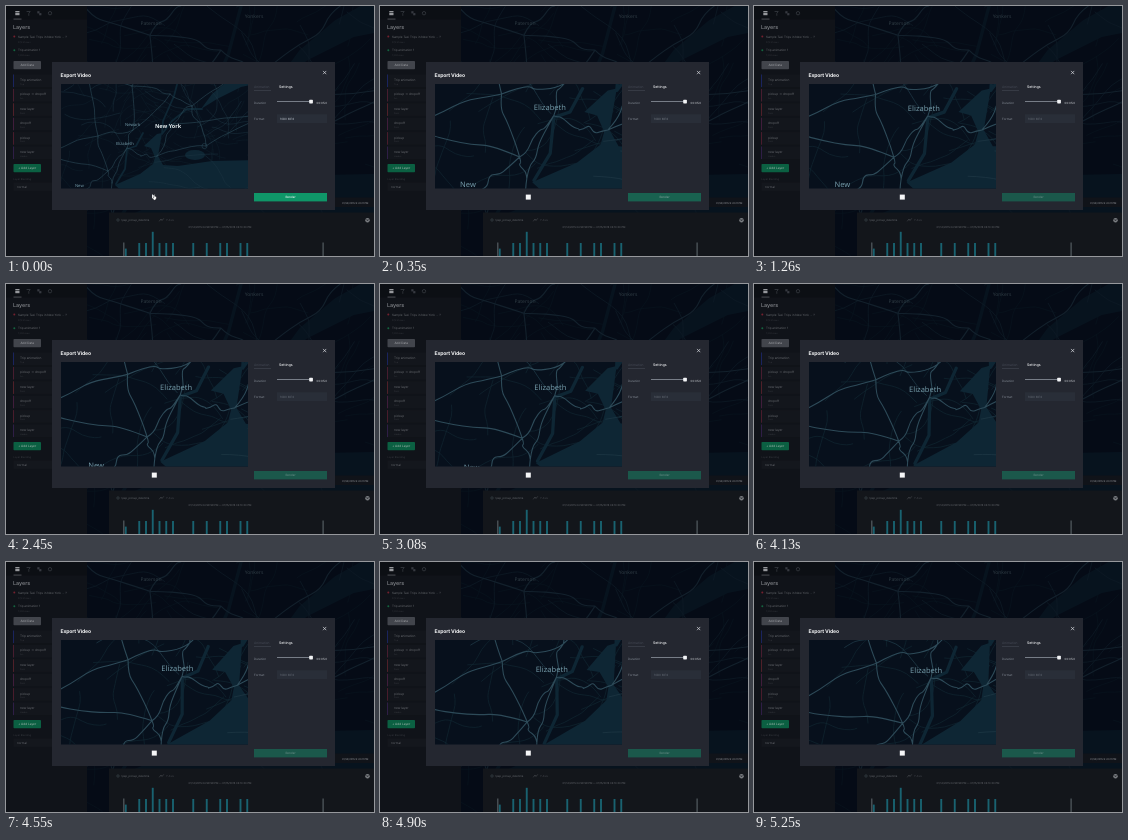
Animation of 368 by 250 pixels, one loop 5.32 s. Source, as an HTML page:

```html
<!DOCTYPE html>
<html lang="en">
<head>
<meta charset="utf-8">
<title>Export Video</title>
<style>
html, body { margin: 0; width: 100%; height: 100%; overflow: hidden; background: #040913; }
svg { display: block; width: 100%; height: 100%; font-family: Inter, "Liberation Sans", sans-serif; text-rendering: geometricPrecision; }
.place { font-family: "Noto Sans", Roboto, sans-serif; text-anchor: middle; }
.line { fill: none; stroke-linecap: round; stroke-linejoin: round; }
</style>
</head>
<body>
<svg id="stage" viewBox="0 0 368 250"></svg>
<script>
const LOOP = 5320, STEP = 70, ZOOM = 1.8;
const MAP = { x: 55, y: 78, w: 187, h: 104.5 };
const ORBIT = { x: 222.4, y: 88 };

const rect = (x, y, w, h, fill, more = '') =>
  `<rect x="${x}" y="${y}" width="${w}" height="${h}" fill="${fill}" ${more}/>`;
const text = (x, y, size, fill, str, more = '') =>
  `<text x="${x}" y="${y}" font-size="${size}" fill="${fill}" ${more}>${str}</text>`;
const line = (d, color, width) =>
  `<path class="line" d="${d}" stroke="${color}" stroke-width="${width}"/>`;
const dot = (x, y, r, fill, more = '') =>
  `<circle cx="${x}" cy="${y}" r="${r}" fill="${fill}" ${more}/>`;

let seed = 41;
function rnd() {
  seed = (seed * 16807) % 2147483647;
  return seed / 2147483647;
}
const spread = size => (rnd() - 0.5) * size;

// Rounded path through the midpoints of a polyline
function smooth(pts) {
  let d = `M${pts[0]}`;
  for (let i = 1; i < pts.length - 1; i++) {
    const [a, b] = [pts[i], pts[i + 1]];
    d += `Q${a} ${(a[0] + b[0]) / 2},${(a[1] + b[1]) / 2}`;
  }
  return d + `L${pts[pts.length - 1]}`;
}

// Street that drifts along one of the two main directions
function street(steps, size) {
  let x = 38 + rnd() * 215, y = 55 + rnd() * 140;
  let a = (rnd() < 0.6 ? -0.85 : 0.5) + spread(0.9);
  const pts = [[x, y]];
  for (let i = 0; i < steps; i++) {
    a += spread(0.9);
    const len = size * (0.5 + rnd());
    x += Math.cos(a) * len;
    y += Math.sin(a) * len;
    pts.push([+x.toFixed(1), +y.toFixed(1)]);
  }
  return smooth(pts);
}
const streets = (n, steps, size) => Array.from({ length: n }, () => street(steps, size)).join('');

const towns = {
  newark: [127, 124], elizabeth: [121, 142], woodbridge: [102, 165], brunswick: [78, 184],
  southwest: [40, 204], west: [38, 146], northwest: [80, 62], summit: [92, 130],
  amboy: [106, 177], south: [112, 204], island: [135, 150], narrows: [151, 150],
  bridge: [164, 88], north: [146, 58], queens: [186, 100], sound: [234, 60],
  shore: [200, 140], east: [256, 108], paterson: [126, 80], heights: [167, 118]
};
const links = `southwest-brunswick brunswick-woodbridge woodbridge-elizabeth elizabeth-newark
  newark-bridge bridge-queens queens-sound newark-summit summit-west summit-northwest
  summit-woodbridge woodbridge-amboy amboy-south woodbridge-west amboy-elizabeth
  elizabeth-island island-narrows narrows-heights heights-queens narrows-shore
  shore-queens heights-east shore-east newark-paterson paterson-north paterson-bridge
  paterson-northwest`.split(/\s+/);

// Highway between two towns, bent a little on the way
function highway(link) {
  const [a, b] = link.split('-').map(k => towns[k]);
  const n = 5, pts = [a];
  for (let i = 1; i < n; i++) {
    pts.push(a.map((v, j) => +(v + (b[j] - v) * i / n + spread(6)).toFixed(1)));
  }
  return smooth([...pts, b]);
}

const water = '#0e2634';
const sea = 'M109 179L134 168 147 158 149 151 145 142 138 140 151 128 156 127 152 150 157 159 172 160 206 155 262 154V215H160V187L121 190Z';
const sound = 'M195 103L206 88 225 72 250 58V78L235 81 211 93Z';
const rivers = 'M156 128L157 115 168 90 178 52M156 128L166 115 181 103H196M137 127L130 140 121 143 119 163 110 178';

const terrain =
  rect(20, 40, 260, 190, '#07101c') +
  line(streets(90, 6, 6), '#122833', 0.35) +
  `<path d="${sea}${sound}" fill="${water}"/>` +
  `<ellipse cx="189" cy="149" rx="10" ry="5" fill="${water}"/>` +
  line(rivers, water, 1.8) +
  line(streets(24, 8, 7), '#1d3643', 0.45) +
  line(links.map(highway).join(''), '#2d4a58', 0.6) +
  dot(198.5, 140, 2.6, 'none', 'stroke="#2b4b59" stroke-width=".5"');

const place = (name, x, y, size = 4.2, color = '#7399a7', weight = 500) =>
  ({ name, x, y, size, color, weight });
const places = [
  place('New York', 162, 120.3, 5.5, '#e3ecef', 600),
  place('Newark', 126.6, 119),
  place('Elizabeth', 118.8, 137.6),
  place('New', 73.3, 180)
];

function sidebar() {
  const layers = [
    ['Trip animation', 'Trip', '#1d2870'], ['pickup → dropoff', 'Arc', '#552035'],
    ['new layer', 'Point', '#60242d'], ['dropoff', 'Point', '#4d2044'],
    ['pickup', 'Point', '#581f31'], ['new layer', 'Hexbin', '#382152']
  ];
  const main = '#65686d', faint = '#36393f';
  const entry = (y, color, name, note) => dot(8.3, y, 1, color) +
    text(12, y + 1.2, 3, main, name) + text(12, y + 6, 2.3, faint, note);
  const button = (y, fill, color, name) =>
    rect(7.5, y, 27.5, 8.2, fill, 'rx=".8"') +
    text(21.2, y + 5.3, 3.1, color, name, 'text-anchor="middle" font-weight="500"');

  let s = rect(0, 0, 81, 250, '#101319') + rect(0, 0, 81, 13.5, '#0c0f14');
  s += rect(9.3, 5, 4.2, 1, '#96989c') + rect(9.3, 6.6, 4.2, 2.6, '#96989c') + rect(7.5, 12.7, 8, 0.7, '#66696e');
  s += line('M21 5.5H24.2L22.8 7.4V9.4', '#373a41', 0.8);
  s += rect(31.3, 5.2, 2.2, 2.2, '#373a41') + rect(33.2, 7.1, 2.2, 2.2, '#373a41');
  s += dot(44, 7.2, 1.7, 'none', 'stroke="#373a41" stroke-width=".8"');
  s += text(7, 22.8, 5.4, '#85888d', 'Layers', 'font-weight="500"');
  s += entry(30.6, '#74202e', 'Sample Taxi Trips in New York ... ?', '97,231 rows');
  s += entry(44.2, '#14633f', 'Trip animation 1', '1,200 rows');
  s += button(55, '#42454c', '#96989d', 'Add Data');
  layers.forEach(([name, kind, color], i) => {
    const y = 68.5 + i * 14.4;
    s += rect(7, y, 66, 12.6, '#13161c') + rect(7, y, 0.8, 12.6, color);
    s += text(14, y + 6.4, 3.2, main, name) + text(14, y + 10.3, 2.2, faint, kind);
  });
  s += button(158, '#0b6042', '#93ada3', '+ Add Layer');
  s += text(7.5, 173.5, 2.5, faint, 'Layer Blending');
  return s + rect(7.5, 176.5, 65.5, 8.3, '#14171d') + text(11, 181.8, 3, main, 'normal');
}

function timeline() {
  const levels = '1.224222..2.2.22.22', main = '#65686d';
  let s = rect(328, 191.5, 40, 9.5, '#101319') + text(336, 197.8, 2.5, '#85888d', '01/14/2015 9:41:21 PM', 'font-weight="500"');
  s += rect(103, 206.5, 265, 44, '#13161b');
  s += dot(112, 214, 1.2, 'none', 'stroke="#3f4b50" stroke-width=".6"');
  s += text(115.5, 215.1, 2.7, main, 'tpep_pickup_datetime');
  s += line('M153.5 215L155 213 156 214.5 157.5 212.7', '#56595f', 0.5) + text(160, 215.1, 2.7, '#484b52', 'Y Axis');
  s += dot(361.5, 214.2, 2.2, '#7d8084') + line('M360.7 213.4L362.3 215M362.3 213.4L360.7 215', '#13161b', 0.6);
  s += text(214, 222.4, 2.6, main, '01/14/2015 04:59:59 PM — 01/15/2015 03:10:20 PM', 'text-anchor="middle"');
  [...levels].forEach((level, i) => {
    const h = level * 5.6 + 1.8;
    if (h) s += rect(118.8 + i * 6.75, 250 - h, 1.9, h, '#196270');
  });
  return s + [117.2, 316.5].map(x => rect(x, 236.5, 1.2, 13.5, '#555d62')).join('');
}

function dialog() {
  let s = rect(46, 56, 283, 148, '#242730');
  s += text(54.6, 71.1, 5.1, '#f4f5f6', 'Export Video', 'font-weight="700" letter-spacing="-.16"');
  s += line('M317.3 65.2L320 67.9M320 65.2L317.3 67.9', '#dcdee2', 0.7);
  s += text(248, 81.9, 3.3, '#444955', 'Animation') + rect(248, 84.2, 17, 0.5, '#484d59');
  s += text(273, 82.1, 3.5, '#eceef0', 'Settings', 'font-weight="500"');
  s += text(248, 98, 3, '#858c96', 'Duration') + rect(271, 95.1, 34, 0.8, '#8d939d');
  s += rect(303.2, 93.7, 3.7, 3.7, '#f2f3f5', 'rx=".7"') + text(310.6, 98.1, 2.9, '#d0d3d8', '00:05.0');
  s += text(248, 113.8, 3, '#858c96', 'Format:') + rect(271, 108.3, 50, 8.7, '#292e38');
  s += text(274, 113.9, 3, '#b9c0c9', '1080 MP4', 'id="format"');
  s += rect(248, 187, 73, 8.4, '#0f9668', 'id="render"');
  return s + text(284.5, 192.3, 3, '#fff', 'Render', 'id="label" text-anchor="middle" font-weight="500"');
}

const preview = `<g clip-path="url(#frame)"><use href="#terrain" id="view"/>` +
  places.map(p => text(0, 0, p.size, p.color, p.name, `class="place" font-weight="${p.weight}"`)).join('') + '</g>';
const pointer = '<g id="pointer"><path d="M146 188.2L150 190.5 146 192.8Z" fill="#e8eaec"/>' +
  '<path d="M148.4 188.3L149.2 188.6 148.8 190.2 150.6 191 150 193.6 148.3 194.2 146.4 192.5 147.6 192Z" fill="#fff" stroke="#0b0c10" stroke-width=".4"/></g>';

const stage = document.getElementById('stage');
stage.innerHTML =
  `<defs><g id="terrain">${terrain}</g><clipPath id="frame">${rect(MAP.x, MAP.y, MAP.w, MAP.h, '#000')}</clipPath></defs>` +
  rect(0, 0, 368, 250, '#040913') +
  '<use href="#terrain" transform="translate(-91.7 -120.4) scale(1.87)" opacity=".36"/>' +
  text(145, 18.6, 5, '#2f3c44', 'Paterson', 'class="place"') +
  text(248, 11.8, 5, '#2f3c44', 'Yonkers', 'class="place"') +
  sidebar() + timeline() + dialog() + preview + pointer +
  rect(145.8, 188.6, 5, 5, '#f5f6f7', 'id="stop"');

const [view, button, label, format, hand, stop] =
  ['view', 'render', 'label', 'format', 'pointer', 'stop'].map(id => document.getElementById(id));
const labels = [...stage.querySelectorAll('#view ~ .place')];

const mix = (a, b, k) => `rgb(${a.map((v, i) => Math.round(v + (b[i] - v) * k))})`;

function draw(now) {
  const t = Math.floor((now % LOOP) / STEP) * STEP;
  const playing = t >= STEP;
  const fade = Math.min(1, t / 420);
  const s = playing ? ZOOM : 1;
  const left = MAP.x * (1 - s), top = (MAP.y + MAP.h) * (1 - s);
  // The camera starts its orbit gently and keeps gaining speed
  const turn = -0.0056 * Math.max(0, t / 1000 - 0.4) ** 2;
  const cos = Math.cos(turn), sin = Math.sin(turn);

  view.setAttribute('transform',
    `rotate(${turn * 180 / Math.PI} ${ORBIT.x} ${ORBIT.y}) translate(${left} ${top}) scale(${s})`);
  places.forEach((p, i) => {
    const dx = left + p.x * s - ORBIT.x, dy = top + p.y * s - ORBIT.y;
    const x = ORBIT.x + dx * cos - dy * sin;
    const y = ORBIT.y + dx * sin + dy * cos + p.size * s * 0.35;
    labels[i].setAttribute('transform', `translate(${x} ${y}) scale(${s})`);
  });

  button.setAttribute('fill', mix([15, 150, 104], [27, 88, 75], fade));
  label.setAttribute('fill', mix([235, 247, 242], [100, 138, 131], fade));
  format.setAttribute('fill', mix([185, 192, 201], [98, 105, 115], fade));
  hand.setAttribute('visibility', playing ? 'hidden' : 'visible');
  stop.setAttribute('visibility', playing ? 'visible' : 'hidden');
}

const start = performance.now();
function tick() {
  draw(performance.now() - start);
  requestAnimationFrame(tick);
}
tick();
</script>
</body>
</html>
```
